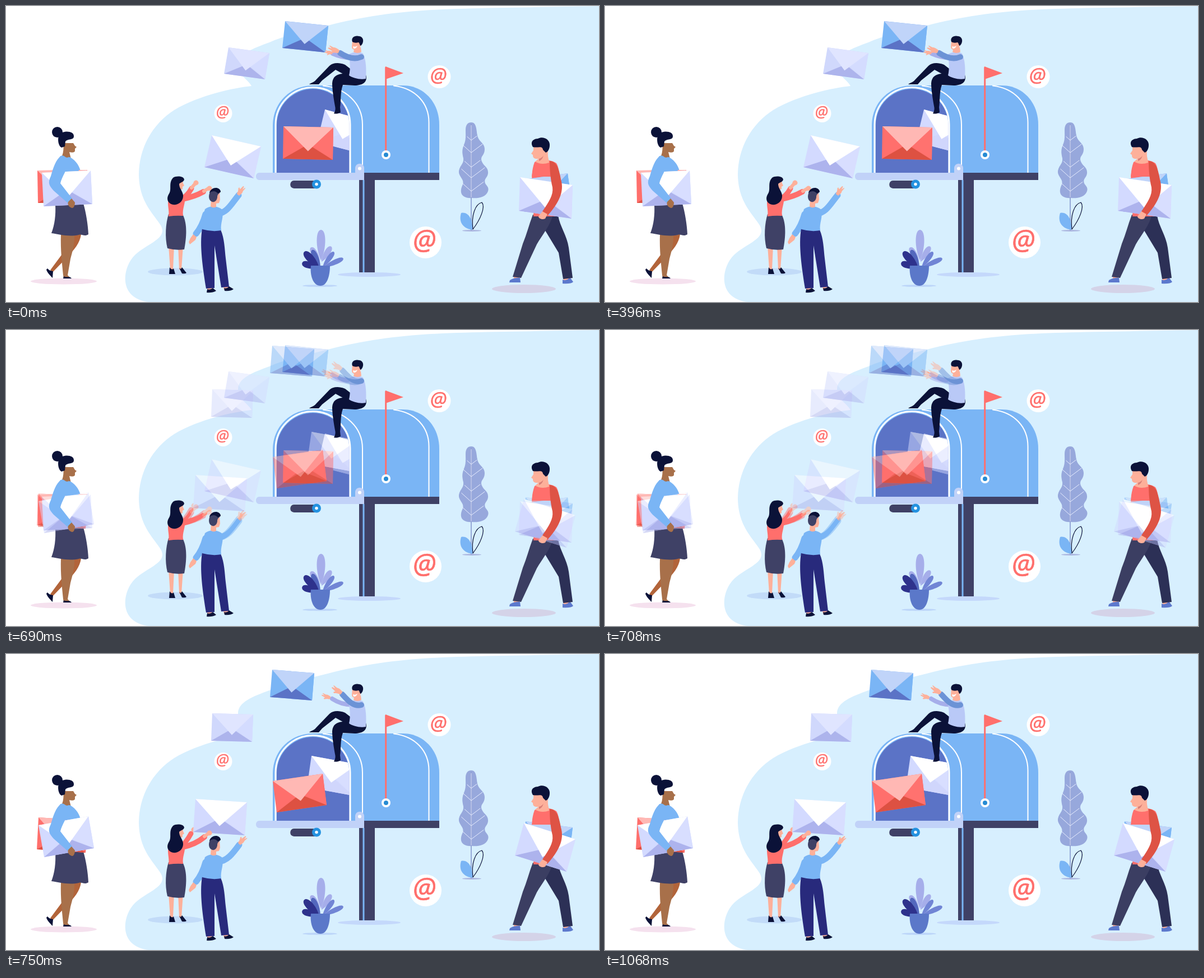
An HTML page that plays this animation: 1058x529 px, repeating every 1280 ms.

```html
<!DOCTYPE html>
<html lang="en">
<head>
<meta charset="utf-8">
<title>Mail delivery</title>
<style>
html, body { margin: 0; width: 100%; height: 100%; overflow: hidden; background: #fff; }
svg { display: block; width: 100vw; height: 100vh; }
text { font: italic 400 34px "Open Sans", sans-serif; text-anchor: middle; stroke-width: .5px; }
</style>
</head>
<body>
<svg viewBox="0 0 1058 529" preserveAspectRatio="none">
  <defs><clipPath id="door"><path d="M483 298V213A64.5 64.5 0 0 1 612.5 213V298Z"/></clipPath></defs>
  <g id="first"></g>
  <g id="second"></g>
</svg>
<script>
const navy = '#0b1238', dark = '#3f4166', blue = '#7ab5f5', indigo = '#5b73c6',
  coral = '#ff6f6c', skin = '#fdb09a', brown = '#a8704a', lilac = '#a6aeea';

// Envelope palettes: left side, right side, bottom, flap
const blueMail = [blue, blue, indigo, '#c0d4f9'];
const paleMail = ['#d0d8fc', '#d4dcff', '#adb4ec', '#e0e5ff'];
const whiteMail = ['#d3daff', '#d8deff', '#adb3ed', '#fff'];
const boxMail = ['#d3daff', '#d8deff', '#d0d6fc', '#fff'];
const redMail = [coral, '#ff726f', '#dd5142', '#ffb8b4'];

const p = (d, fill) => `<path d="${d}" fill="${fill}"/>`;
const line = (d, color, w = 2) =>
  `<path d="${d}" fill="none" stroke="${color}" stroke-width="${w}" stroke-linecap="round" stroke-linejoin="round"/>`;
const oval = (x, y, rx, ry, fill) => `<ellipse cx="${x}" cy="${y}" rx="${rx}" ry="${ry}" fill="${fill}"/>`;
const leaf = (x, y, len, w, angle, fill) =>
  `<path transform="translate(${x} ${y}) rotate(${angle})" fill="${fill}" d="M0 0C${-w} ${-len * .4} ${-w} ${-len} 0 ${-len}C${w} ${-len} ${w} ${-len * .4} 0 0Z"/>`;
const hand = (x, y, angle, s = 1, fill = skin) =>
  `<path transform="translate(${x} ${y}) rotate(${angle}) scale(${s})" fill="${fill}" d="M-2-3C3-4 5-5 9-8L11-7L9-4L18-3V-1L12 0L18 2L17 3L10 3C6 5 2 4-2 3Z"/>`;
const fist = (x, y) => oval(x, y, 4.6, 4.4, skin);

// Parallelogram from three corners; the flap tip sits at the given depth
function envelope([x0, y0, x1, y1, x2, y2], [left, right, bottom, flap], depth = .77) {
  const x3 = x0 + x2 - x1, y3 = y0 + y2 - y1;
  const at = k => `${(x0 + x1) / 2 + (x2 - x1) * k} ${(y0 + y1) / 2 + (y2 - y1) * k}`;
  return p(`M${x0} ${y0}L${x1} ${y1}L${x2} ${y2}L${x3} ${y3}Z`, left) +
    p(`M${x1} ${y1}L${x2} ${y2}L${at(.5)}Z`, right) +
    p(`M${x3} ${y3}L${x2} ${y2}L${at(.54)}Z`, bottom) +
    p(`M${x0} ${y0}L${x1} ${y1}L${at(depth)}Z`, flap);
}

function badge(x, y, r) {
  return oval(x, y, r, r, '#fff') +
    `<text transform="translate(${x - r * .07} ${y + r * .45}) scale(${r / 20})" fill="${coral}" stroke="${coral}">@</text>`;
}

function backdrop() {
  return p('M0 0H1058V529H0Z', '#fff') +
    p('M1058 0C960 2 850 3 780 6C700 10 640 18 574 35C540 44 500 51 470 65C440 76 414 86 414 106C414 124 432 131 438 143C408 146 345 159 300 186C260 212 237 255 237 302C238 350 262 370 276 392C290 416 250 425 230 445C212 463 206 496 222 514C230 523 243 528 255 529H1058Z', '#d7effe') +
    badge(773, 126.5, 20.5) + badge(387.5, 192, 16) + badge(748.5, 422.5, 28.5);
}

function mailbox(pick) {
  return oval(648, 480, 56, 4, '#c4d8fb') +
    p('M630 311H658V476H630Z', dark) + p('M636.5 311H639.5V476H636.5Z', blue) +
    p('M476 298V214C476 172 508 142 548 142H708C745 142 773 172 773 212V298Z', blue) +
    line('M754.5 298V208C754.5 173 730 147 692 142.5', '#fff', 2) +
    line('M636 286V212C636 173 605 146 566 142.5', '#fff', 2) +
    p('M483 298V213A64.5 64.5 0 0 1 612.5 213V298Z', indigo) +
    line('M481 298V212A66.5 66.5 0 0 1 614 212V298', '#fff', 3) +
    `<g clip-path="url(#door)">${envelope(pick([569, 185, 652, 207, 638, 265], [545, 182, 627, 197, 619, 253]), boxMail, .72)}</g>` +
    envelope(pick([495, 215, 584, 217, 583, 275], [476, 227, 565, 214, 572, 270]), redMail, .75) +
    p('M639 298H773V311H639Z', dark) +
    p('M452 298H639V311H452C444 311 444 298 452 298Z', '#c1d2f8') +
    p('M623 311V290C623 279 639 279 639 290V311Z', '#c1d2f8') + oval(631, 290.5, 3, 3, '#fff') +
    p('M514 312H553V326H514C505 326 505 312 514 312Z', dark) +
    oval(554, 318.5, 8, 8, '#2492e0') + oval(554, 318.5, 2.7, 2.7, '#fff') +
    line('M677.7 110V260', coral, 3) + p('M677 108L709 120L677 131Z', coral) +
    oval(678, 266, 8, 8, '#fff') + oval(678, 266, 4, 4, '#268bd3');
}

function sitter(pick) {
  const far = pick('M624 91Q606 95 583 85', 'M624 90Q602 93 582 80');
  const near = pick('M634 91C622 96 608 92 596 84', 'M634 91C620 95 610 83 600 72');
  return line(far, lilac, 8) + pick(hand(581, 84, 194, .7), hand(577, 78, 205, .8)) +
    p('M640 132L605 105C592 100 583 102 577 107L553 132C549 137 544 137 541 140H558L564 133L588 114L606 124Z', navy) +
    p('M642 123C646 136 636 142 622 142L601 141C596 155 598 170 596 181L597 190C592 193 588 193 585 192C588 187 588 183 587 179C584 162 582 148 582 138C583 126 590 122 600 121L614 121Z', navy) +
    p('M611 87C618 81 632 81 637 85C643 97 643 115 642 130C632 132 619 129 612 124C615 112 614 98 611 87Z', '#b9c9f7') +
    p('M622 74H633L634 82C629 85 623 84 620 82Z', skin) +
    p('M618 62L617 73C617 79 625 80 629 77C634 73 635 64 633 60Z', skin) +
    p('M618 64C615 56 623 52 630 54C639 55 639 66 633 71C631 71 631 66 629 65C625 66 621 66 618 64Z', navy) +
    p('M619 72Q623 74 627 71Q625 77 620 76Z', '#fff') +
    line(near, '#6c93d6', 10) + pick(hand(592, 81, 206), hand(597, 69, 217));
}

function walker(pick) {
  return oval(103, 492, 59, 5.5, '#f5e1ee') +
    p('M112 408H134C132 424 121 436 111 447L83 476L79 472L99 445Z', '#b2643a') +
    p('M74 469C77 473 80 473 84 474L83 486C80 483 73 476 72 471Z', navy) +
    p('M98 408H122C123 425 118 440 115 452L110 481L115 486H103L102 481C100 459 97 437 98 408Z', brown) +
    p('M103 483C108 486 114 482 117 487H102Z', navy) +
    p('M88 355L138 353C143 370 146 390 147 408C140 413 135 407 130 409C112 413 94 408 81 406C87 391 89 373 88 355Z', dark) +
    p('M102 245H120L123 250L126 252L123 255V259Q122 263 113 261L116 273Q107 279 99 270Q104 260 102 245Z', brown) +
    oval(91.5, 225.5, 9.5, 9.5, navy) +
    p('M94 232C98 222 122 222 121 233C121 240 110 237 106 242L105 251L99 253C93 250 92 238 94 232Z', navy) +
    p('M96 269C101 266 105 274 114 270C126 277 132 287 134 300V354H92V320Z', blue) +
    envelope(pick([56, 294, 145, 293, 146, 351], [58, 292, 145, 298, 142, 355]), redMail) +
    p('M112 270C122 275 127 285 130 295L108 297L91 295C92 281 95 269 98 268C103 267 106 273 112 270Z', blue) +
    envelope(pick([64, 298, 151, 294, 154, 354], [58, 306, 147, 290, 157, 347]), whiteMail) +
    p('M98 268C89 274 84 290 80 304C74 316 77 321 85 330L110 352L118 344L97 317C99 306 110 292 113 275C108 272 102 265 98 268Z', blue) +
    p('M111 350L117 344L123 351C123 356 121 361 118 361C113 360 109 355 111 350Z', brown);
}

function waver(pick) {
  return oval(302, 475, 49, 6.5, '#c2dbf8') +
    pick(line('M309 349Q324 339 331 326', coral, 9) + line('M331 325L337 318', skin, 6) + fist(339, 316),
      line('M309 348Q322 336 330 321', coral, 9) + fist(335, 314)) +
    p('M290 428H300L298 471H293ZM307 428H316L313 471H309Z', skin) +
    p('M292 467Q296 473 299 469L302 479H291ZM309 468Q312 472 314 467L322 477Q320 479 314 478Z', navy) +
    p('M290 372H315C324 389 322 414 318 435Q302 437 288 433C283 413 285 388 290 372Z', dark);
}

function waverTop(pick) {
  return p('M290 343C297 334 314 333 319 340C321 353 314 361 316 375Q303 374 290 376C292 364 287 357 290 343Z', coral) +
    line(pick('M315 345Q336 341 352 332', 'M315 345Q337 341 354 327'), coral, 10) +
    pick(line('M353 331L361 326', skin, 6) + fist(363, 326), line('M354 326L361 321', skin, 6) + fist(363, 320)) +
    p('M304 310H315L316 317L318 321L315 323V327Q312 329 309 328L310 338L300 337Z', skin) +
    p('M298 307C304 303 317 304 318 310C317 315 311 315 309 318C309 327 317 332 316 341C315 351 306 356 298 355C288 353 286 344 290 337C297 328 289 317 298 307Z', navy);
}

function reacher(pick) {
  return line('M356 372Q350 394 339 407', blue, 11) +
    p('M334 408L340 413L338 418L328 426L326 422L329 415Z', skin) +
    p('M359 500H367L369 510H359ZM387 498H396L398 507H389Z', skin) +
    p('M359 506Q364 508 369 504L375 509Q368 513 358 512ZM389 504Q394 506 398 501L406 506Q400 510 390 509Z', navy) +
    p('M350 398L383 400C390 416 390 434 392 451L398 502L384 503L372 428L372 504L357 505C351 468 345 427 350 398Z', '#282a7c') +
    line(pick('M378 371C394 370 402 354 415 338', 'M378 371C394 371 405 356 416 341'), blue, 11) +
    pick(hand(415, 336, -50, .9), hand(417, 338, -42, .9)) +
    p('M355 363C363 356 378 357 386 364C389 378 382 388 384 401Q368 404 350 399C354 386 351 374 355 363Z', blue) +
    p('M367 334H381L382 346L380 352L375 353V359Q369 362 365 358Z', skin) +
    p('M363 335C364 324 382 322 383 332C380 336 377 336 377 342C376 349 371 351 368 350C362 348 361 341 363 335Z', dark) +
    p('M363 334C366 323 381 322 383 332L378 335C374 330 368 330 363 334Z', navy);
}

function carrier(pick) {
  return oval(924, 505.5, 57, 7.5, '#d4d3e8') +
    p('M994 482H1006L1009 491H995Z', skin) + p('M906 481H916L914 490H906Z', skin) +
    p('M993 489Q1000 492 1006 485L1012 493Q1008 497 993 496ZM899 490Q908 485 917 486L918 494H898Z', '#5c79cd') +
    p('M952 374H985C988 394 1001 410 1004 432L1011 486L994 488L986 441L960 398Z', '#2c3056') +
    p('M940 373H976C971 392 957 409 947 426L919 486L904 484L922 425C929 408 933 391 940 373Z', '#3b3e62') +
    p('M943 279C954 272 974 275 982 281C990 292 988 331 984 376H941C944 345 932 308 943 279Z', coral) +
    envelope(pick([917, 311, 1002, 299, 1010, 356], [927, 299, 1011, 310, 1004, 368]), blueMail, .6) +
    p('M940 292C943 277 953 274 968 276L982 285V305H938Z', coral) +
    envelope(pick([917, 306, 1011, 320, 1009, 380], [924, 302, 1016, 331, 1000, 389]), whiteMail, .8) +
    p('M970 277C985 278 987 295 991 314C996 337 981 358 966 375L957 367C968 351 977 338 975 324C971 307 970 291 970 277Z', '#de5345') +
    p('M957 367L966 372L962 380C956 383 950 379 950 376Z', skin) +
    p('M941 251H963L967 261C966 270 969 275 969 280Q955 285 944 278L950 273C941 274 940 270 940 266L937 264L941 258Z', skin) +
    p('M951 273Q957 271 959 267Q957 275 951 277Z', '#d98078') +
    p('M940 252C934 242 942 237 949 237C959 232 971 239 970 249C970 255 967 261 963 262L958 257C957 249 949 254 940 252Z', navy);
}

function plants() {
  let veins = line('M830 212V400', '#6878bd', 1.2) + line('M830 213V342', '#eef2ff', 1);
  for (const [y, w] of [[240, 10], [262, 20], [288, 16], [307, 24], [331, 22]])
    veins += line(`M${830 - w * .72} ${y - w * .65}L830 ${y}L${830 + w} ${y - w * .75}`, '#e8edff', 1);
  return oval(831, 401.5, 17, 1.5, '#aab5df') +
    p('M830 208C840 208 839 222 841 231C843 243 854 244 854 256C854 268 845 268 849 278C852 286 861 288 860 299C859 308 852 308 855 317C858 322 862 324 860 331C856 343 840 344 831 343C821 344 810 340 812 328C813 320 818 318 814 310C810 303 806 299 809 291C812 283 817 281 816 272C814 263 813 258 817 248C821 240 820 230 820 222C820 212 824 208 830 208Z', '#97a8dc') + veins +
    p('M832 400C812 397 808 383 812 370C824 367 833 380 832 400Z', blue) +
    line('M833 399C830 374 837 354 849 351C856 359 846 382 833 399Z', navy, 1.2) +
    oval(560, 500, 31, 2, '#bcd5f9') +
    leaf(562, 455, 55, 10, 0, lilac) + leaf(560, 457, 30, 7, -32, lilac) + leaf(563, 457, 32, 7, 32, lilac) +
    leaf(561, 469, 36, 7, -24, '#5368bd') + leaf(565, 467, 34, 6, 36, '#7185d5') +
    leaf(566, 467, 39, 6, 66, '#7185d5') + leaf(559, 469, 40, 9, -42, '#2e328c') +
    leaf(555, 468, 28, 8, -72, '#2e328c') +
    p('M544 464H578C578 482 573 500 561 500C548 500 542 482 544 464Z', '#5b78c9');
}

function scene(pose) {
  const pick = (...poses) => poses[pose];
  return backdrop() + plants() + mailbox(pick) +
    envelope(pick([397, 74, 470, 84, 462, 131], [368, 106, 441, 108, 439, 157]), paleMail) +
    envelope(pick([498, 27, 575, 35, 570, 83], [475, 28, 550, 34, 546, 83]), blueMail) +
    sitter(pick) + walker(pick) + waver(pick) +
    envelope(pick([367, 231, 455, 251, 442, 308], [338, 259, 430, 265, 426, 324]), whiteMail) +
    waverTop(pick) + reacher(pick) + carrier(pick);
}

const second = document.getElementById('second');
document.getElementById('first').innerHTML = scene(0);
second.innerHTML = scene(1);

// Hold, dissolve to the second pose in four steps, hold, cut back
const loop = 1280, fadeAt = 660, step = 30;
const start = performance.now();
function draw(now) {
  const t = Math.max(0, now - start) % loop;
  const mix = Math.floor((t - fadeAt) / step) + 1;
  second.setAttribute('opacity', Math.min(4, Math.max(0, mix)) / 4);
  requestAnimationFrame(draw);
}
draw(start);
</script>
</body>
</html>
```
